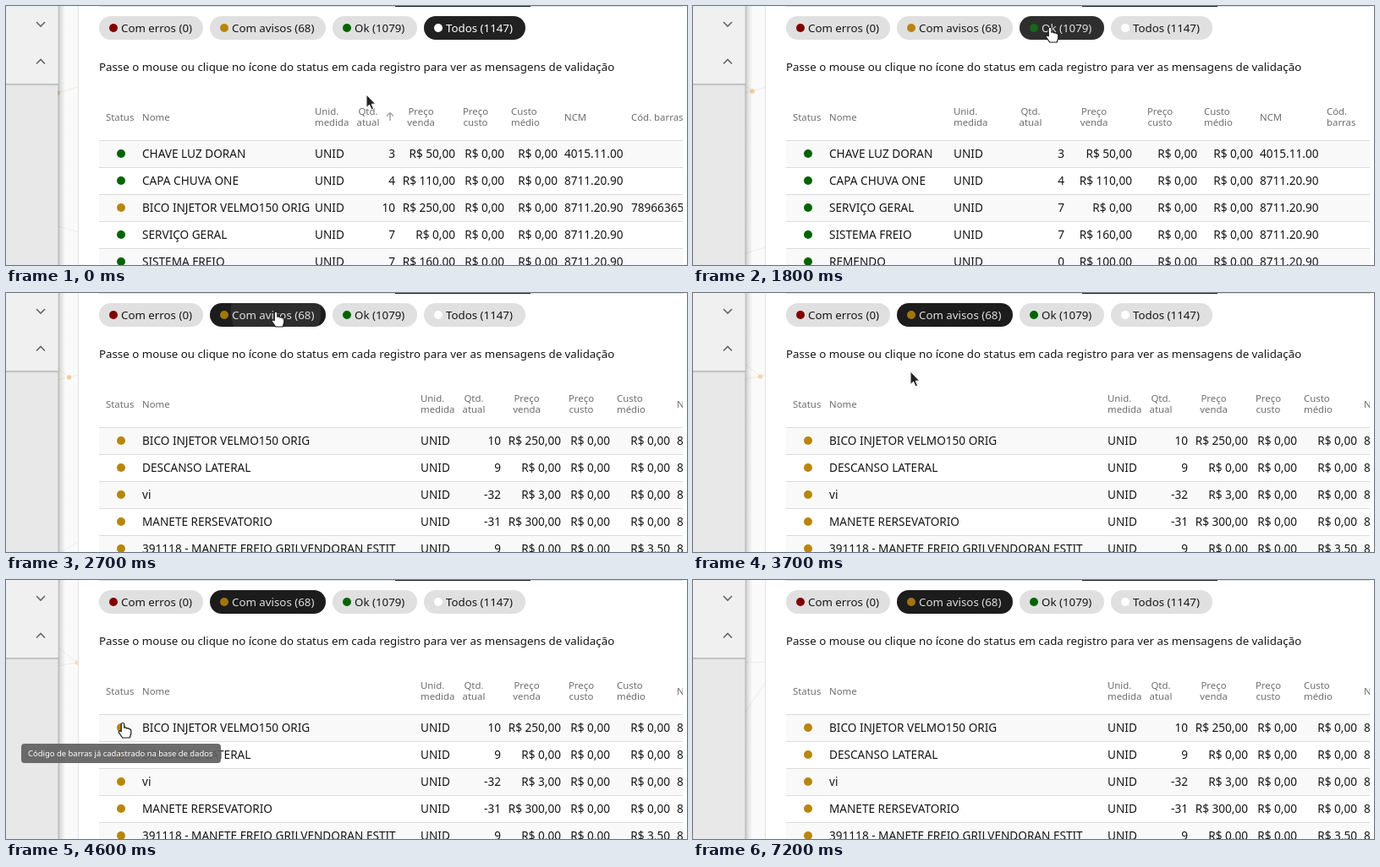
Recreate the animation shown at these times as an HTML page. Size 805 by 307 pixels, loop 7.3 s.

```html
<!DOCTYPE html>
<html lang="pt-BR">
<head>
<meta charset="utf-8">
<title>Validação de registros</title>
<style>
  html, body { margin: 0; width: 100%; height: 100%; overflow: hidden; background: #fff; }
  svg { display: block; width: 805px; height: 307px; }
  text { font-family: "Noto Sans", "Open Sans", sans-serif; font-size: 13.3px; fill: #161616; }
  .cell { font-size: 13.6px; }
  .head { font-size: 11.4px; fill: #6e6e6e; }
  .tip { font-size: 9.46px; fill: #fff; }
  .mid { text-anchor: middle; }
  .end { text-anchor: end; }
  .line { fill: none; stroke-width: 1; }
</style>
</head>
<body>
<svg id="stage" viewBox="0 0 805 307">
  <defs>
    <clipPath id="tableClip"><rect x="110" y="100" width="690" height="207"/></clipPath>
    <clipPath id="stripClip"><rect x="61" width="25" height="307"/></clipPath>
    <clipPath id="chipClip"><rect id="chipShape" y="12" height="28" rx="14"/></clipPath>
    <linearGradient id="sideShade">
      <stop offset="0" stop-color="#000" stop-opacity=".32"/>
      <stop offset=".35" stop-color="#000" stop-opacity=".12"/>
      <stop offset="1" stop-color="#000" stop-opacity="0"/>
    </linearGradient>
    <linearGradient id="panelShade" x2="0" y2="1">
      <stop offset="0" stop-color="#000" stop-opacity=".24"/>
      <stop offset="1" stop-color="#000" stop-opacity="0"/>
    </linearGradient>
  </defs>
</svg>
<script>
const LOOP = 7300, STEP = 100;
const GREEN = '#006400', GOLD = '#b8860b';
const stage = document.getElementById('stage');
const chipShape = document.getElementById('chipShape');

function add(parent, tag, attrs = {}, content) {
  const el = document.createElementNS('http://www.w3.org/2000/svg', tag);
  for (const k in attrs) el.setAttribute(k, attrs[k]);
  if (content !== undefined) el.textContent = content;
  parent.append(el);
  return el;
}
const rect = (p, x, y, width, height, fill, rx = 0) => add(p, 'rect', { x, y, width, height, fill, rx });
const dot = (p, cx, cy, r, fill) => add(p, 'circle', { cx, cy, r, fill });
const label = (p, x, y, str, cls = '') => add(p, 'text', { x, y, class: cls }, str);
const stroke = (p, d, color, width = 1) => add(p, 'path', { d, class: 'line', stroke: color, style: `stroke-width:${width}` });
const show = (el, on) => { el.style.display = on ? '' : 'none'; };

// Background strip with the drifting network
rect(stage, 0, 0, 805, 307, '#fff');
const strip = add(stage, 'g', { 'clip-path': 'url(#stripClip)' });
rect(strip, 61, 0, 25, 307, '#fafafa');
const farLines = stroke(strip, '', '#ececec');
const nodeLines = stroke(strip, '', '#f4e9dc');
const node = dot(strip, 0, 0, 2.7, '#f2c99c');
rect(stage, 85, 0, 1, 307, '#e3e3e3');

// Sidebar
rect(stage, 61, 0, 9, 307, 'url(#sideShade)');
rect(stage, 0, 0, 61.5, 307, '#e8e8e8');
rect(stage, 0, 92, 61.5, 3, 'url(#panelShade)');
rect(stage, 0, 0, 61.5, 92, '#f0f0f0');
stroke(stage, 'M36 19L41 24L46 19M36 68.5L41 63.5L46 68.5', '#666', 1.6);

// Tab bar edge
rect(stage, 110, 0, 690, 1, '#dedede');
rect(stage, 460, 0, 160, 1, '#212121');

// Filter chips
const chips = [
  [110, 123, 'Com erros (0)', '#800000'],
  [241, 137, 'Com avisos (68)', GOLD],
  [386, 100, 'Ok (1079)', GREEN],
  [494, 120, 'Todos (1147)', '#fff']
].map(([x, w, str, color]) => ({
  x, w,
  box: rect(stage, x, 12, w, 28, '#e0e0e0', 14),
  dot: dot(stage, x + 17, 26, 5, color),
  text: label(stage, x + 26, 31, str)
}));
const rippleClip = add(stage, 'g', { 'clip-path': 'url(#chipClip)' });
const ripple = dot(rippleClip, 0, 0, 0, 'rgba(255,255,255,.08)');

label(stage, 110, 77, 'Passe o mouse ou clique no ícone do status em cada registro para ver as mensagens de validação');

// Tables: shared rows, one column layout per filter
const NCM = '8711.20.90';
const lamp = [GREEN, 'CHAVE LUZ DORAN', 3, '50,00', '0,00', '4015.11.00'];
const cape = [GREEN, 'CAPA CHUVA ONE', 4, '110,00', '0,00', NCM];
const nozzle = [GOLD, 'BICO INJETOR VELMO150 ORIG', 10, '250,00', '0,00', NCM, '7896636512'];
const service = [GREEN, 'SERVIÇO GERAL', 7, '0,00', '0,00', NCM];
const brake = [GREEN, 'SISTEMA FREIO', 7, '160,00', '0,00', NCM];

function table(c, rows) {
  const g = add(stage, 'g', { 'clip-path': 'url(#tableClip)' });
  const head2 = (x, a, b, cls = '') => {
    label(g, x, 129, a, 'head ' + cls);
    label(g, x, 142, b, 'head ' + cls);
  };
  label(g, 118, 136, 'Status', 'head');
  label(g, 161, 136, 'Nome', 'head');
  head2(c.unit, 'Unid.', 'medida');
  head2(c.qty[0], 'Qtd.', 'atual', 'mid');
  head2(c.price[0], 'Preço', 'venda', 'mid');
  head2(c.cost[0], 'Preço', 'custo', 'mid');
  head2(c.mean[0], 'Custo', 'médio');
  label(g, c.ncm, 136, 'NCM', 'head');
  if (c.wide) label(g, c.code, 136, 'Cód. barras', 'head');
  else head2(c.code, 'Cód.', 'barras');

  rows.forEach(([color, name, qty, price, mean, ncm, code = ''], i) => {
    const y = 160 + 32 * i;
    const cell = (x, str, cls = '') => label(g, x, y + 20, str, 'cell ' + cls);
    if (i % 2 === 0) rect(g, 110, y, 690, 31, '#f9f9f9');
    rect(g, 110, y - 1, 690, 1, '#dcdcdc');
    dot(g, 136, y + 15, 5, color);
    cell(161, name);
    cell(c.unit, 'UNID');
    cell(c.qty[1], qty, 'end');
    cell(c.price[1], 'R$ ' + price, 'end');
    cell(c.cost[1], 'R$ 0,00', 'end');
    cell(c.mean[1], 'R$ ' + mean, 'end');
    cell(c.ncm, ncm);
    cell(c.code, code);
  });
  return g;
}

const all = table(
  { unit: 365, qty: [428, 460], price: [490.5, 531], cost: [555, 589], mean: [597, 652], ncm: 660, code: 739, wide: true },
  [lamp, cape, nozzle, service, brake]);
const valid = table(
  { unit: 308, qty: [399, 439], price: [474, 519], cost: [552, 596], mean: [604, 662], ncm: 670, code: 749 },
  [lamp, cape, service, brake, [GREEN, 'REMENDO', 0, '100,00', '0,00', NCM]]);
const warned = table(
  { unit: 490, qty: [553, 585], price: [615.5, 656], cost: [680, 714], mean: [722, 785], ncm: 793, code: 872 },
  [nozzle,
   [GOLD, 'DESCANSO LATERAL', 9, '0,00', '0,00', NCM],
   [GOLD, 'vi', -32, '3,00', '0,00', NCM],
   [GOLD, 'MANETE RERSEVATORIO', -31, '300,00', '0,00', NCM],
   [GOLD, '391118 - MANETE FREIO GRILVENDORAN ESTIT', 9, '0,00', '3,50', NCM]]);
const sortArrow = stroke(all, 'M454 136V126.5M450 130.5L454 126.5L458 130.5', '#a6a6a6', 1.5);

// Tooltip
const tip = add(stage, 'g');
rect(tip, 18, 194, 236, 23, 'rgba(97,97,97,.93)', 4);
label(tip, 26, 209, 'Código de barras já cadastrado na base de dados', 'tip');

// Pointers, both with the tip at 0,0
const pointer = add(stage, 'g');
const arrow = add(pointer, 'path', {
  d: 'M0 0V15.5L3.6 12.2L6 17.8L8.6 16.7L6.2 11.2H10.8Z',
  fill: '#222', stroke: '#fff', 'stroke-width': 1, 'stroke-linejoin': 'round'
});
const hand = add(pointer, 'path', {
  d: 'M-1.8 1.5Q0-1 1.8 1.5V6.2Q3.6 5.2 4.8 6.9Q6.6 6 7.4 7.6Q9.8 7.2 9.8 10V13L8.2 18H-.3L-4.8 11.6Q-5.2 8.6-1.8 10.6Z',
  fill: '#fff', stroke: '#1a1a1a', 'stroke-width': 1.2, 'stroke-linejoin': 'round'
});

// Pointer path: time, x, y
const path = [
  [0, 426, 105], [100, 426, 104], [700, 425, 25], [1100, 422, 25], [1800, 422, 25],
  [2300, 322, 23], [2500, 319, 22], [3300, 319, 22], [3700, 257, 93], [4000, 147, 136],
  [4200, 138, 169], [5900, 138, 169], [6000, 135, 171], [6200, 148, 122],
  [6600, 148, 122], [6800, 45, 4], [LOOP, 45, 4]
];

// Chip presses: time and chip picked from then on
const presses = [[-LOOP, 3], [1200, 2], [2500, 1]];

const clamp = v => Math.min(1, Math.max(0, v));
const ramp = (t, from, to) => clamp((t - from) / (to - from));
const ease = u => u * u * (3 - 2 * u);

function pointerAt(t) {
  const i = Math.max(1, path.findIndex(k => k[0] > t));
  const [t0, x0, y0] = path[i - 1], [t1, x1, y1] = path[i];
  const u = ease(ramp(t, t0, t1));
  return [x0 + (x1 - x0) * u, y0 + (y1 - y0) * u];
}

function drawNetwork(t) {
  const s = t / 1000, x = 61 + 5.05 * s, y = 103 - 1.1 * s;
  const fade = 1 - .55 * ramp(t, 2500, 5000);
  node.setAttribute('cx', x);
  node.setAttribute('cy', y);
  node.style.opacity = fade;
  nodeLines.style.opacity = 1 - ramp(t, 5000, 5700);
  nodeLines.setAttribute('d', `M${x} ${y}L${x + 30} ${y - 9}M${x} ${y}L${x - 30} ${y - 24}M${x} ${y}L${x - 30} ${y + 5}`);
  const late = ramp(t, 4600, 5700);
  farLines.setAttribute('d', late
    ? `M61 ${102 - 4 * late}L86 97M61 ${150 + 8 * late}L86 ${116 + 5 * late}`
    : `M61 ${261 + 18 * s}L86 ${268 + 10 * s}`);
}

function drawChips(t, over) {
  const [since, picked] = presses.filter(p => p[0] <= t).pop();
  chips.forEach((c, i) => {
    const on = i === picked, dim = on && i < 3;
    c.box.setAttribute('fill', !on ? '#e0e0e0' : dim ? '#1c1c1c' : '#212121');
    c.text.style.fill = !on ? '' : dim ? '#dedede' : '#fff';
    c.dot.style.opacity = dim ? .85 : 1;
  });

  // The press spreads a light circle that stays until the pointer leaves
  const chip = chips[picked];
  const [cx, cy] = pointerAt(since);
  chipShape.setAttribute('x', chip.x);
  chipShape.setAttribute('width', chip.w);
  ripple.setAttribute('cx', cx);
  ripple.setAttribute('cy', cy);
  ripple.setAttribute('r', 80 * ramp(t, since, since + 300));
  show(ripple, over(chip));
}

function render(t) {
  const [x, y] = pointerAt(t);
  const over = c => y > 12 && y < 40 && x > c.x && x < c.x + c.w;
  drawNetwork(t);
  drawChips(t, over);

  show(all, t < 1300);
  show(valid, t >= 1300 && t < 2600);
  show(warned, t >= 2600);
  sortArrow.style.opacity = 1 - ramp(t, 200, 600);
  tip.style.opacity = ramp(t, 4200, 4500) * (1 - ramp(t, 6000, 6100));

  const onStatus = t < 6000 && Math.abs(x - 136) < 9 && Math.abs(y - 175) < 9;
  const isHand = onStatus || chips.some(over);
  show(hand, isHand);
  show(arrow, !isHand);
  show(pointer, t < 7000);
  pointer.setAttribute('transform', `translate(${Math.round(x)} ${Math.round(y)})`);
}

const start = performance.now();
function tick() {
  const t = Math.max(0, performance.now() - start) % LOOP;
  render(Math.floor(t / STEP) * STEP);
  requestAnimationFrame(tick);
}
tick();
</script>
</body>
</html>
```
